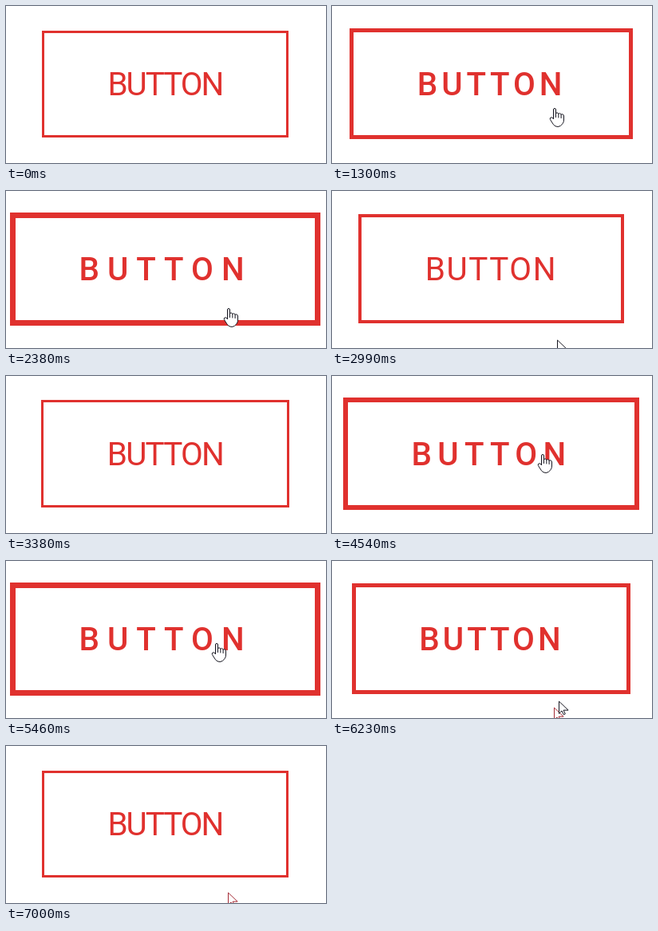
Recreate the animation shown at these times as an HTML page. Size 401 by 197 pixels, loop 7.15 s.

```html
<!DOCTYPE html>
<html lang="en">
<head>
<meta charset="utf-8">
<title>Button hover</title>
<style>
  html, body { margin: 0; width: 100%; height: 100%; overflow: hidden; background: #fff; }
  svg { display: block; width: 100vw; height: 100vh; }
  text { font-family: Roboto, Arial, sans-serif; font-size: 40.4px; }
  .cursor { fill: #fff; stroke: #161620; stroke-linejoin: round; stroke-linecap: round; }
  #ghost { stroke: #a52a35; }
</style>
</head>
<body>
<svg viewBox="0 0 401 197" xmlns="http://www.w3.org/2000/svg">
  <defs>
    <path id="pointer" d="M.5 .5V15.5L4 12 6.3 16.8 8.3 15.9 6.1 11.2H11.7Z"/>
  </defs>
  <rect id="frame" fill="none" stroke="#e0312e"/>
  <text id="label" y="112" fill="#e0312e">BUTTON</text>
  <use id="ghost" class="cursor" href="#pointer"/>
  <use id="arrow" class="cursor" href="#pointer"/>
  <g id="hand" class="cursor">
    <path d="M-1.5 13.5V2Q-1.5 .5 0 .5T1.5 2V7Q2 5.8 3.2 5.9 4.6 6 4.8 7.6 5.4 6.5 6.6 6.7 8 7 8.1 8.5 8.8 7.5 9.8 7.8 11.5 8.2 11.5 10V15Q11.5 18 9.8 19.8 7.5 23.5 4 23.5 .5 23.5-1.5 20.8L-5.5 14.6Q-6.3 12.8-5 12-3.6 11.3-2.4 12.4Z"/>
    <path d="M1.5 7V11.5M4.8 7.6V12M8.1 8.5V12.5" fill="none"/>
  </g>
</svg>
<script>
const LOOP = 7150, TICK = 76.7, GROW = 1000;
const [box, label, ghost, arrow, hand] =
  ['frame', 'label', 'ghost', 'arrow', 'hand'].map(id => document.getElementById(id));

// The picture moves from start to stop; the hover state flips at flip;
// the pointer glides between two points during glide.
const legs = [
  { open: true, start: 460, stop: 1920, flip: 903, glide: [460, 1300], from: [284, 200], to: [279, 128] },
  { open: false, start: 2380, stop: 3535, flip: 2478, glide: [2215, 2990], from: [279, 128], to: [282, 187] },
  { open: true, start: 3930, stop: 5005, flip: 3958, glide: [3920, 4120], from: [297, 196], to: [264, 98] },
  { open: false, start: 5460, stop: 7000, flip: 5887, glide: [5430, 6150], from: [264, 98], to: [278, 184],
    park: { at: [284, 176], until: 6980 } }
];

const clamp = v => Math.min(1, Math.max(0, v));
const mix = (a, b, f) => a + (b - a) * f;

// cubic-bezier(0, 0, .58, 1)
function easeOut(t) {
  if (t <= 0 || t >= 1) return clamp(t);
  let lo = 0, hi = 1;
  for (let i = 0; i < 24; i++) {
    const u = (lo + hi) / 2;
    if (1.74 * (1 - u) * u * u + u ** 3 < t) lo = u; else hi = u;
  }
  return 3 * (1 - lo) * lo * lo + lo ** 3;
}

// time held in even steps, frozen once the leg has stopped
function snap({ start, stop }, time) {
  const steps = Math.floor((Math.min(time, stop) - start + 8) / TICK);
  return Math.min(stop, start + steps * TICK);
}

function pointerAt({ open, glide: [begin, end], from, to, park }, t) {
  if (!open && t > end + TICK / 2) return park && t < park.until ? park.at : null;
  const u = clamp((t - begin) / (end - begin));
  const f = open ? u : easeOut(u);
  return from.map((v, i) => Math.floor(mix(v, to[i], f)));
}

function place(el, pos) {
  el.style.display = pos ? '' : 'none';
  if (pos) el.setAttribute('transform', `translate(${pos})`);
}

function drawButton(p) {
  const left = Math.round(45 - 40 * p), right = Math.round(354 + 40 * p);
  const top = Math.floor(31 - 4 * p), bottom = Math.floor(165 + 4 * p);
  const w = Math.round(3 + 4 * p);
  const attrs = {
    x: left + w / 2, y: top + w / 2,
    width: right - left - w, height: bottom - top - w, 'stroke-width': w
  };
  for (const name in attrs) box.setAttribute(name, attrs[name]);

  label.setAttribute('x', 127.4 - 36 * p);
  label.style.letterSpacing = -2 + 12 * p + 'px';
  label.style.fontWeight = p < 0.5 ? 400 : 500;
}

function draw(time) {
  const leg = legs.findLast(l => time >= l.start);
  let p = 0, pos = null, hover = false, trace = null;
  if (leg) {
    const t = snap(leg, time);
    const eased = easeOut((t - leg.flip) / GROW);
    p = leg.open ? eased : 1 - eased;
    hover = (t >= leg.flip) === leg.open;
    pos = pointerAt(leg, t);
    if (leg.park && t >= leg.glide[1]) trace = leg.to;
  }
  drawButton(p);
  place(ghost, trace);
  place(arrow, hover ? null : pos);
  place(hand, hover ? pos : null);
}

const begin = performance.now();
function tick() {
  draw((performance.now() - begin) % LOOP);
  requestAnimationFrame(tick);
}
tick();
</script>
</body>
</html>
```
